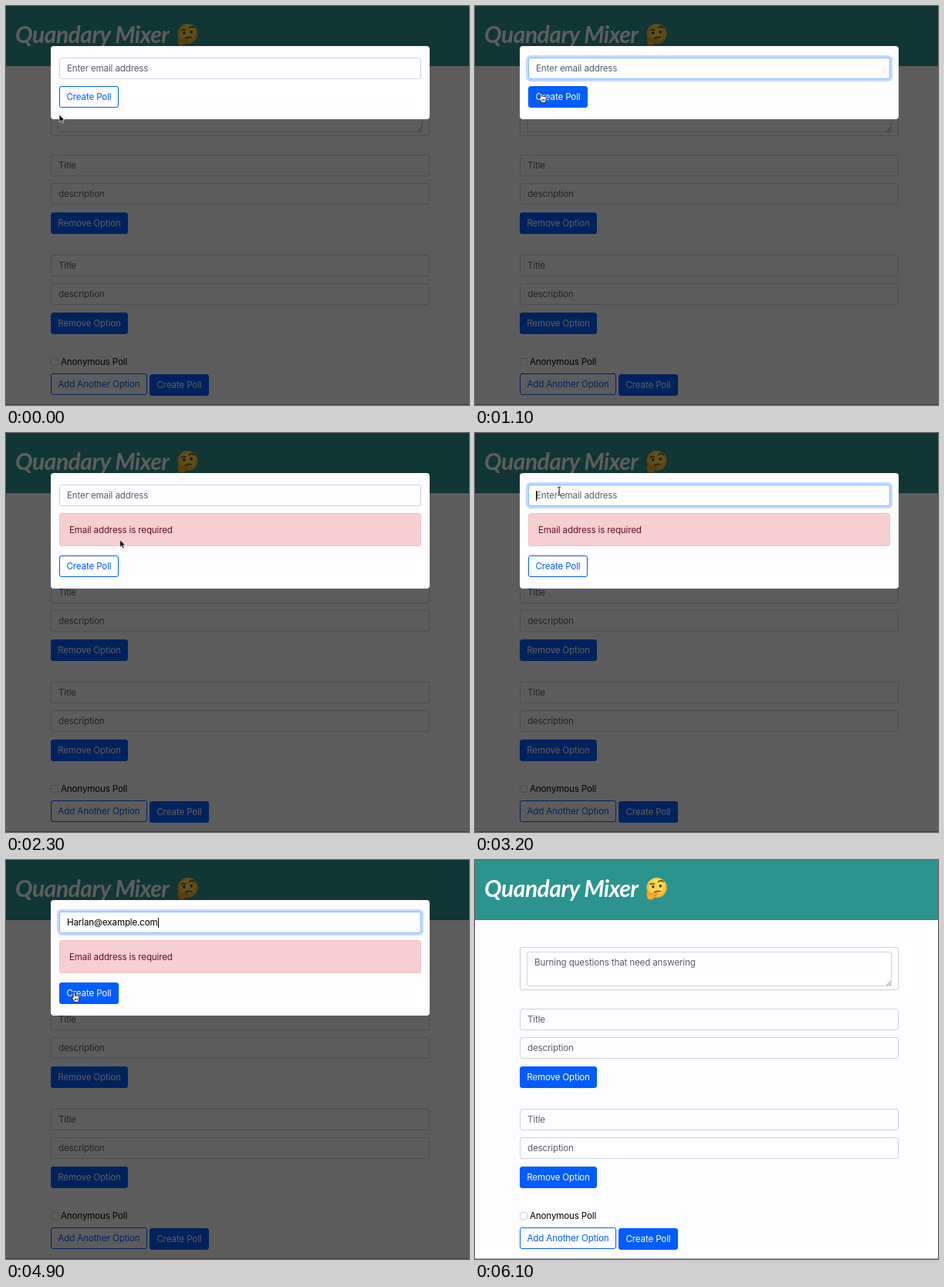
An HTML page for the animation above (6.6 s loop, 600 by 518 pixels).

```html
<!DOCTYPE html>
<html lang="en">
<head>
<meta charset="utf-8">
<title>Poll form</title>
<style>
html, body { margin: 0; width: 100%; height: 100%; overflow: hidden; background: #fdfcfe; }
#stage { position: relative; width: 600px; height: 518px; overflow: hidden; color: #000;
  font: 11.6px Inter, Roboto, sans-serif; letter-spacing: -.15px; }
#stage * { box-sizing: border-box; }
#stage > *, #modal > * { position: absolute; white-space: pre; }
header { left: 0; top: 0; width: 600px; height: 78px; background: #2b948f; border-bottom: 1px solid #268580; }
h1 { position: absolute; left: 12px; top: 15px; margin: 0; color: #fff;
  font: italic 700 30px/42px Pacifico, Lato, sans-serif; letter-spacing: -.5px; }
header svg { position: absolute; left: 221px; top: 22px; }
.field, .card { left: 58px; width: 491px; height: 28px; padding-left: 9px; line-height: 27px;
  border: 1px solid #ced4da; border-radius: 3px; background: #fefdff; color: #585f66; }
.card { top: 113px; height: 56px; border-color: #cdcdd0; }
.area { left: 67px; top: 119px; width: 473px; height: 45px; }
.btn { height: 28px; line-height: 26px; border: 1px solid #005cfb; border-radius: 3px;
  background: #005cfb; color: #fff; text-align: center; }
.outline { background: #fefdff; color: #005cfb; }
.remove { left: 58px; width: 100px; }
.check { left: 58px; top: 457px; width: 10px; height: 10px; border: 1px solid #c9cbcf; border-radius: 2.5px; background: #fff; }
.grip { left: 532px; top: 156px; }
.base { left: 0; top: 517px; width: 600px; height: 1px; background: #a9a9ab; }
#shade { inset: 0; background: rgba(0, 0, 0, .63); }
#modal { left: 58px; top: 52px; width: 491px; border-radius: 4px; background: #fefdff; }
#email { left: 11px; top: 15px; width: 469px; }
#email.focus { border-color: #86b7fe; box-shadow: 0 0 0 3px rgba(13, 110, 253, .25); }
#typed { color: #000; }
#caret { display: inline-block; width: 1px; height: 13px; margin-right: -1px; vertical-align: -2.5px; background: #000; }
#alert { left: 11px; top: 52px; width: 469px; height: 43px; padding-left: 12px; line-height: 42px;
  border: 1px solid #f3c1c4; border-radius: 3px; background: #f7cfd1; color: #62101b; }
#submit { left: 11px; width: 77px; }
#pointer { left: 0; top: 0; overflow: visible; }
#pointer path { stroke-linejoin: round; }
</style>
</head>
<body>
<div id="stage">
  <header>
    <h1>Quandary Mixer</h1>
    <svg width="28" height="30" viewBox="0 0 28 30">
      <defs><radialGradient id="skin" cy=".4" r=".62">
        <stop offset=".45" stop-color="#ffdc4d"/><stop offset="1" stop-color="#f5a523"/>
      </radialGradient></defs>
      <circle cx="14.5" cy="14" r="13" fill="url(#skin)"/>
      <g fill="none" stroke="#6a3c12" stroke-width="1.5" stroke-linecap="round">
        <path d="M6 9.6q3-2 5.5-.6M16.5 6.5q3-3 6.5-.5M11.5 19.6q4-1.8 7.5-.8"/>
      </g>
      <g fill="#4f2c10"><ellipse cx="9.8" cy="12.8" rx="1.6" ry="2"/><ellipse cx="19.2" cy="11.8" rx="1.6" ry="2"/></g>
      <path d="M1.5 20.2q1.6-1.6 2.8.6l1.2 2 8-2.4q2.4-.4 2.2 1.3-.3 1.1-2.2 1.5l-2 .6q2 1.2.5 2.6-1.5 2.8-5 3.2-4.3.3-5.1-4z"
        fill="#f8ae2b" stroke="#d47a12" stroke-width=".8"/>
    </svg>
  </header>
  <div class="card"></div>
  <div class="field area">Burning questions that need answering</div>
  <svg class="grip" width="8" height="8"><path d="M1 7 7 1M4 7 7 4" stroke="#666" stroke-width=".8"/></svg>
  <div class="field" style="top:193px">Title</div>
  <div class="field" style="top:230px">description</div>
  <div class="btn remove" style="top:268px">Remove Option</div>
  <div class="field" style="top:323px">Title</div>
  <div class="field" style="top:360px">description</div>
  <div class="btn remove" style="top:398px">Remove Option</div>
  <div class="check"></div>
  <div style="left:71px;top:448.5px;line-height:27px">Anonymous Poll</div>
  <div class="btn outline" style="left:58px;top:477px;width:125px">Add Another Option</div>
  <div class="btn" style="left:186px;top:478px;width:77px">Create Poll</div>
  <div class="base"></div>
  <div id="shade"></div>
  <div id="modal">
    <div id="email" class="field"><span id="typed"></span><span id="caret"></span><span id="hint">Enter email address</span></div>
    <div id="alert">Email address is required</div>
    <div id="submit" class="btn">Create Poll</div>
  </div>
  <svg id="pointer" width="14" height="16"><path/></svg>
</div>
<script>
const LOOP = 6600, STEP = 100, CLOSE = 5000, ERROR = 1400;
const ADDRESS = 'Harlan@example.com';
const $ = id => document.getElementById(id);
const pointerPath = document.querySelector('#pointer path');

// path, fill, stroke, stroke width
const SHAPES = {
  arrow: ['M0 0V9.6L2.2 7.6 3.7 11 5.4 10.2 3.9 7H6.9Z', '#000', '#fff', .7],
  hand: ['M2.6 7.5V1.8a1.1 1.1 0 0 1 2.2 0V5a1 1 0 0 1 1.8.1 1 1 0 0 1 1.8.4.9.9 0 0 1 1.8.5V9c0 2-1 2.4-1.2 4H4.2C4 11 2 10 .7 7.6.3 6.6 1.6 6 2.6 7.5ZM5 10.8V8.2M6.6 10.8V8.2M8.2 10.8V8.2', '#fff', '#111', .8],
  beam: ['M-2-5.5Q0-5.5 0-4.2 0-5.5 2-5.5M0-4.2V4.2M-2 5.5Q0 5.5 0 4.2 0 5.5 2 5.5M-1 1.5H1', 'none', '#111', 1]
};

// time, x, y, shape until the next stop
const STOPS = [
  [0, 69, 141, 'arrow'], [200, 85, 110, 'arrow'], [300, 100, 90, 'beam'], [400, 110, 81, 'beam'],
  [700, 110, 81, 'beam'], [900, 82, 112.5, 'hand'], [1500, 82, 112.5, 'hand'],
  [1600, 142, 137, 'arrow'], [1900, 150, 140, 'arrow'], [2600, 146, 138, 'arrow'],
  [2900, 112, 84, 'beam'], [3100, 109, 75.5, 'beam'], [3500, 109, 75.5, ''],
  [4500, 109, 80, 'beam'], [4600, 100, 110, 'arrow'], [4700, 86, 165, 'hand'],
  [4800, 84.5, 171.5, 'hand'], [5600, 84.5, 171.5, ''], [LOOP, 84.5, 171.5, '']
];

const between = (t, a, b) => t >= a && t < b;
const show = (el, on) => { el.style.display = on ? '' : 'none'; };

function hoverAmount(t) {
  if (t === 900 || t === 1600 || t === 4700) return .55;
  return between(t, 1000, 1600) || t >= 4800 ? 1 : 0;
}

function typedCount(t) {
  if (t < 3500) return 0;
  if (t < 3800) return Math.min(3, (t - 3300) / 100);
  return Math.min(ADDRESS.length, Math.round(3 + (t - 3700) / 700 * 15));
}

function drawPointer(t) {
  const i = STOPS.findIndex(stop => stop[0] > t);
  const [t0, x0, y0, shape] = STOPS[i - 1], [t1, x1, y1] = STOPS[i];
  show($('pointer'), shape);
  if (!shape) return;
  const k = (t - t0) / (t1 - t0);
  $('pointer').style.transform = `translate(${x0 + (x1 - x0) * k}px, ${y0 + (y1 - y0) * k}px)`;
  ['d', 'fill', 'stroke', 'stroke-width'].forEach((name, n) => pointerPath.setAttribute(name, SHAPES[shape][n]));
}

function drawModal(t) {
  const open = t < CLOSE, failed = t >= ERROR;
  show($('shade'), open);
  show($('modal'), open);
  show($('alert'), failed);
  $('modal').style.height = failed ? '150px' : '95px';

  const count = typedCount(t);
  $('email').classList.toggle('focus', between(t, 500, 1300) || t >= 3000);
  $('typed').textContent = ADDRESS.slice(0, count);
  show($('hint'), !count);
  show($('caret'), between(t, 500, 1000) || t >= 3000);

  const h = hoverAmount(t), button = $('submit').style;
  button.top = failed ? '107px' : '52px';
  button.background = `rgba(0, 92, 251, ${h})`;
  button.color = `rgb(${255 * h}, ${92 + 163 * h}, ${251 + 4 * h})`;
}

function frame(now) {
  const t = Math.floor(now % LOOP / STEP) * STEP;
  drawModal(t);
  drawPointer(t);
  requestAnimationFrame(frame);
}
frame(0);
</script>
</body>
</html>
```
